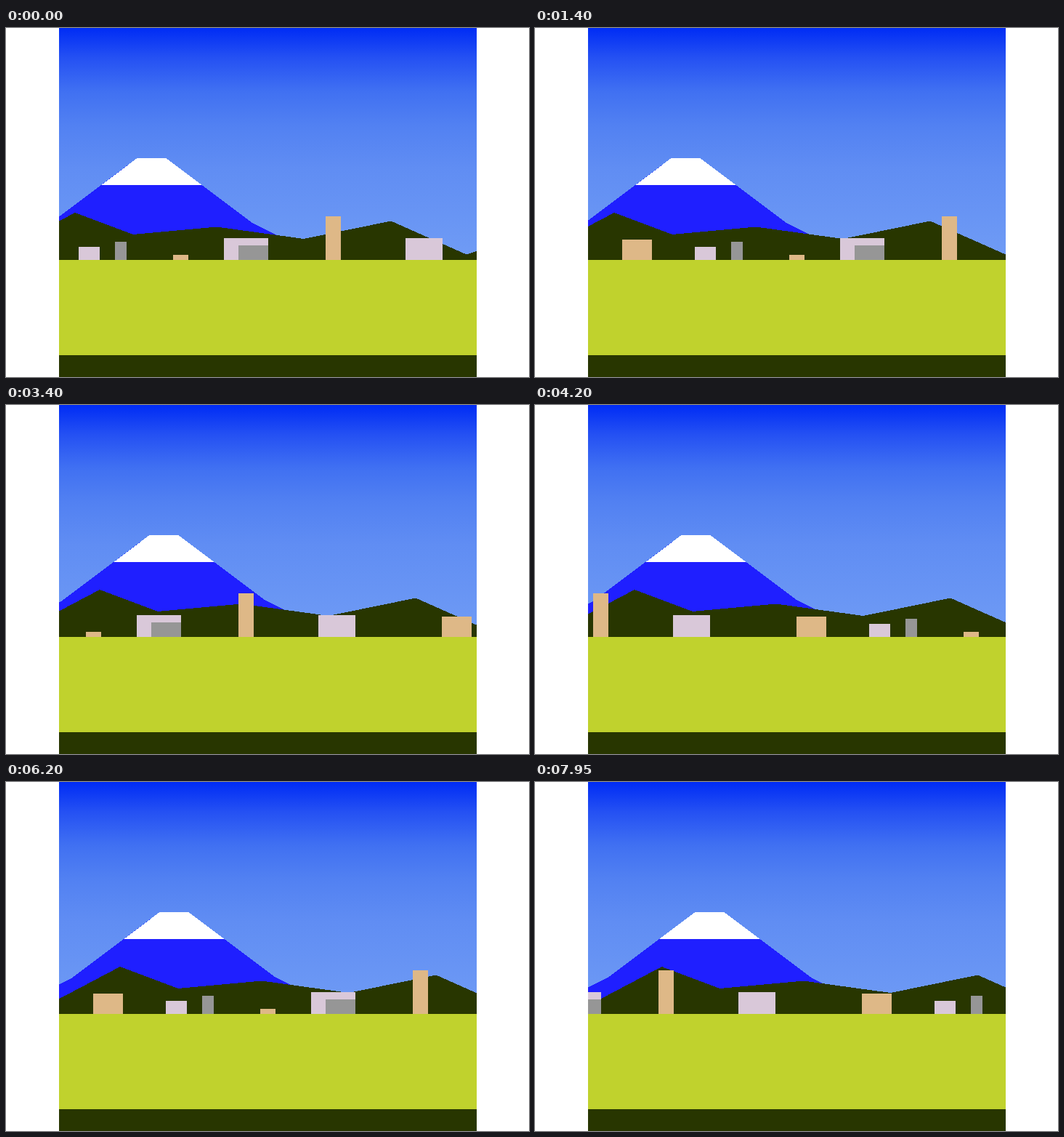
Write an HTML page that moves like this. It is 720 by 480 pixels and loops after 8000 ms.

```html
<!DOCTYPE html>
<html lang="en">
<head>
<meta charset="utf-8">
<title>Window view</title>
<style>
  html, body { margin: 0; width: 100%; height: 100%; overflow: hidden; background: #fff; }
  svg { display: block; width: 720px; height: 480px; }
</style>
</head>
<body>
<svg viewBox="0 0 720 480" shape-rendering="crispEdges">
  <defs>
    <linearGradient id="sky" x1="0" y1="0" x2="0" y2="320" gradientUnits="userSpaceOnUse">
      <stop offset="0" stop-color="#002cf5"/>
      <stop offset=".125" stop-color="#2450f3"/>
      <stop offset=".27" stop-color="#4070f2"/>
      <stop offset=".42" stop-color="#5281f2"/>
      <stop offset=".6" stop-color="#608df3"/>
      <stop offset="1" stop-color="#709cf5"/>
    </linearGradient>
    <clipPath id="view"><rect x="73" width="575" height="480"/></clipPath>
  </defs>
  <g clip-path="url(#view)">
    <rect width="720" height="320" fill="url(#sky)"/>
    <g id="mountain">
      <path fill="#1f1fff" d="M0 299 60 269 180 179H220L340 269 400 299V320H0Z"/>
      <path fill="#fff" d="M180 179H220L269.3 216H130.7Z"/>
    </g>
    <path id="hills" fill="#283600"
      d="M-15 312 95 254 175 284 290 273.5 410 290 530 265.5 634 311.5 700 290V320H-15Z"/>
    <g id="town"></g>
    <rect y="319" width="720" height="131" fill="#c0d22d"/>
    <rect y="450" width="720" height="30" fill="#283600"/>
  </g>
</svg>
<script>
const STEP = 50, LOOP = 8000, TOWN_WIDTH = 720, GROUND = 319;
const tan = '#deb887', pink = '#d9c8d9', grey = '#969696';

// x, width, top, colour
const buildings = [
  [0, 41, 291, tan], [100, 29, 301, pink], [150, 16, 294, grey], [230, 21, 312, tan],
  [300, 61, 289, pink], [320, 41, 299, grey], [440, 21, 259, tan], [550, 51, 289, pink]
];

const byId = id => document.getElementById(id);
const [mountain, hills, town] = ['mountain', 'hills', 'town'].map(byId);
const slide = (layer, x) => layer.setAttribute('transform', `translate(${x} 0)`);

// Two copies side by side let the town wrap around
town.innerHTML = [-TOWN_WIDTH, 0].map(offset =>
  buildings.map(([x, width, top, fill]) =>
    `<rect x="${x + offset}" y="${top}" width="${width}" height="${GROUND - top}" fill="${fill}"/>`
  ).join('')
).join('');

function draw(now) {
  const step = Math.floor(now % LOOP / STEP);
  slide(mountain, 0.5 + step * 0.25);
  slide(hills, step * 0.5);
  slide(town, step * 30 % TOWN_WIDTH);
}

const start = performance.now();
function tick() {
  draw(performance.now() - start);
  requestAnimationFrame(tick);
}
tick();
</script>
</body>
</html>
```
